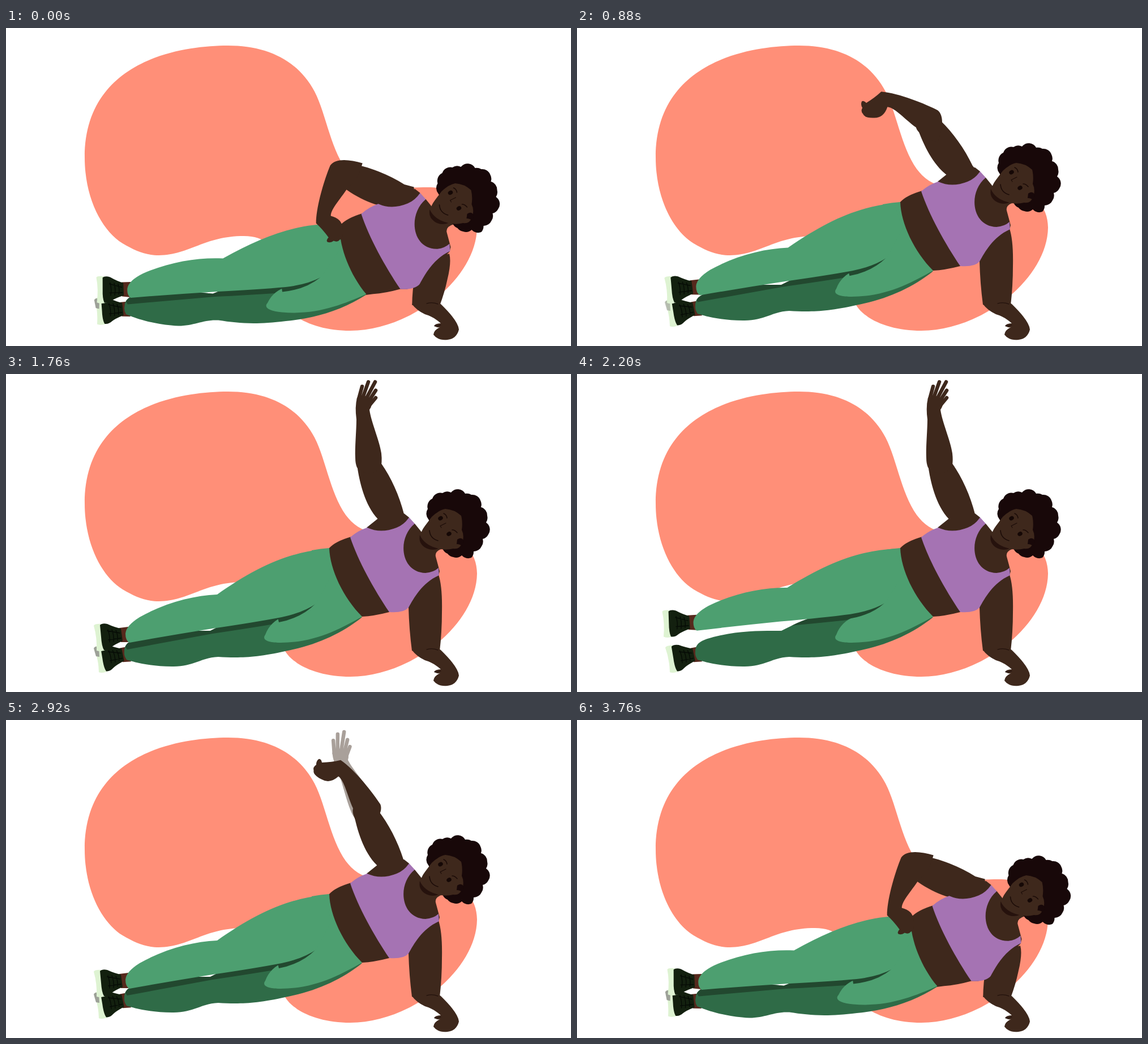
Animation of 998x561 px, one loop 3.8 s. Source, as an HTML page:

```html
<!DOCTYPE html>
<html lang="en">
<head>
<meta charset="utf-8">
<title>Side plank</title>
<style>
  html, body { margin: 0; width: 100%; height: 100%; overflow: hidden; background: #fff; }
  svg { display: block; width: 100vw; height: 100vh; }
  .skin { fill: #3e281c; }
  .light { fill: #4d9f70; }
  .dark { fill: #2f6b47; }
  .shade { fill: #22482f; }
  .line { fill: none; stroke: #1c0c08; stroke-width: 1.6; stroke-linecap: round; stroke-linejoin: round; }
  .thin { stroke-width: 1.1; }
  .lace { stroke: #050a05; stroke-width: 1.3; }
</style>
</head>
<body>
<svg viewBox="0 0 998 561" preserveAspectRatio="none">
  <defs>
    <path id="backLeg" d="M209 490C209 473 222 469 245 463C290 452 330 453 361 453C385 441 410 428 440 424L560 400L629 429C590 460 545 479 493 489C440 501 410 501 375 499C345 500 330 517 293 516C255 516 225 508 213 504Q208 497 209 490Z"/>
    <clipPath id="onBackLeg"><use href="#backLeg"/></clipPath>
    <g id="shoe">
      <path fill="#56291d" d="M200 448L216 446L218 473L203 473Z"/>
      <path fill="#def3d2" d="M155 444Q157 440 169 441L178 486Q168 491 160 488Q161 465 155 444Z"/>
      <path fill="#13200f" d="M166 443Q170 439 179 441Q192 447 203 449L206 471Q192 477 186 482Q180 488 173 487Q169 480 168 464Z"/>
      <path class="line lace" d="M180 451Q184 462 183 473M187 451Q191 461 190 472M194 452Q198 461 197 470M179 453L201 457M181 469L203 466"/>
    </g>
  </defs>

  <path fill="#ff8f78" d="M392 31C301 31 139 61 139 228C139 300 169 357 206 380C228 393 247 401 270 401C325 400 350 367 420 367C500 367 460 445 493 489C510 516 555 534 608 534C715 534 831 442 832 352C832 310 800 281 745 281C700 281 665 288 628 273C577 248 570 160 545 112C515 56 460 31 392 31Z"/>

  <g id="prop" class="skin">
    <path d="M764 354Q771 375 770 420Q770 455 766 489L755 500L717 488Q712 450 711 411L730 365Z"/>
  </g>
  <path class="skin" d="M717 487Q725 498 740 505Q755 509 768 521Q760 521 756 525Q760 529 767 528Q756 532 755 541Q763 552 780 550Q796 548 800 532Q799 517 768 487Q745 470 717 487Z"/>
  <path class="line thin" d="M743 486Q753 483 763 487M757 526L768 524"/>

  <g id="torso">
    <path class="skin" d="M550 325L571 307Q582 295 610 287L690 420L677 420Q650 427 629 428L612 430L570 390Z"/>
    <path class="skin" d="M705 262L722 264L735 280L772 308Q757 312 759 322L766 348L764 356L711 410L680 400Z"/>
    <path class="skin" d="M637 271L657 255L703 246L712 253L712 275L650 285Z"/>
    <path id="upper" class="skin" d="M620 160C624 190 634 232 657 256L655 275Q690 290 712 262L703 247C695 215 680 182 663 158Z"/>
    <path fill="#a573b3" d="M608 288Q622 276 638 271Q662 282 690 271Q703 266 712 253L722 264C690 290 697 350 741 351Q755 350 764 342L765 355C735 368 720 396 711 412Q702 422 677 420C650 380 622 330 608 288Z"/>
  </g>

  <g id="pants">
    <use href="#shoe" transform="translate(1 38) rotate(-4 165 445)"/>
    <path id="soleShade" fill="#9da198" d="M155 484Q157 479 164 482L165 499L159 498Z"/>
    <use href="#backLeg" class="dark"/>
    <g clip-path="url(#onBackLeg)">
      <path class="shade lift" d="M205 474L290 460L365 448L440 436L520 412L546 406Q520 430 480 440Q420 450 365 458L214 486Z"/>
    </g>
    <path class="light" d="M540 311Q556 308 571 307C572 345 596 395 629 428C590 450 545 474 485 474C460 474 452 468 458 460C464 444 475 434 490 428Q512 418 520 400Z"/>
    <path class="shade lift" d="M480 430Q525 419 546 406Q522 430 482 438Z"/>
    <g class="lift">
      <use href="#shoe"/>
      <path class="light" d="M211 458Q212 444 236 429C280 404 330 391 373 389C440 342 495 316 560 309L575 355L548 405Q525 421 487 429Q440 438 365 449Q290 461 218 474Q211 470 211 458Z"/>
    </g>
  </g>

  <g id="arm" class="skin">
    <g id="open">
      <path d="M620 165Q617 158 617 148C616 130 619 100 619 80Q616 58 620 42Q630 34 646 44Q648 55 642 63C645 85 660 118 663 140Q665 158 661 166Q641 185 620 165Z"/>
      <path fill="none" stroke="#3e281c" stroke-width="6.5" stroke-linecap="round" d="M623 44L629 22M630 42L640 14M637 42L652 14M642 46L653 29M643 54L653 42"/>
    </g>
    <path id="fist" d="M606 210C582 203 558 201 549 214C540 235 524 285 524 316Q536 327 546 341Q541 346 544 349Q550 351 555 347Q562 350 566 345Q573 342 571 325Q570 308 550 303C550 290 570 270 582 250Q596 245 606 210Z"/>
  </g>

  <g id="head">
    <path id="hair" fill="#180809"/>
    <path class="skin" d="M752 252Q765 240 776 238Q792 239 804 250Q807 262 805 275Q810 285 806 298Q801 310 790 308Q775 312 760 307Q740 303 733 288Q731 280 740 268Z"/>
    <path fill="#180809" d="M797 292Q806 286 809 296L806 304Q802 300 796 300Z"/>
    <path fill="#26120d" d="M731 284Q728 298 740 306Q752 313 764 308Q742 303 733 288Z"/>
    <g fill="#150806">
      <ellipse cx="767.5" cy="254.5" rx="3.6" ry="4.4" transform="rotate(60 767.5 254.5)"/>
      <ellipse cx="782.5" cy="282" rx="3.6" ry="4.4" transform="rotate(60 782.5 282)"/>
    </g>
    <path class="line" d="M773 246Q778 248 779 254M788 275Q793 275 797 280M748 276Q749 290 763 294"/>
    <path class="line thin" d="M777 263L767 268L769 271"/>
  </g>
</svg>
<script>
const LOOP = 3800;
const SHOULDER = [682, 266];
const RAISED_ELBOW = [641, 160], HIP_ELBOW = [575, 228];
const UPPER_TURN = -49, OPEN_TURN = -135, FIST_TURN = 145;

const $ = id => document.getElementById(id);
const lifted = document.querySelectorAll('.lift');
const clamp = v => Math.min(1, Math.max(0, v));
const ease = (t, from, to) => (1 - Math.cos(Math.PI * clamp((t - from) / (to - from)))) / 2;
const pulse = (t, from, half) => ease(t, from, from + half) - ease(t, from + half, from + 2 * half);
const set = (el, value) => el.setAttribute('transform', value);

// Curls: round bumps between neighbouring valleys of the outline
const curls = ['745 238', '753 220', '771 210', '786 209', '811 211', '822 213', '838 223', '839 235',
  '850 250', '848 262', '852 283', '842 291', '840 304', '826 313', '822 324', '805 320', '790 323',
  '780 317', '772 310'];
$('hair').setAttribute('d', 'M746 256' + curls.map(p => 'A15 15 0 0 1 ' + p).join('') + 'L760 280Z');

function turn([x, y], [cx, cy], deg) {
  const a = deg * Math.PI / 180, c = Math.cos(a), s = Math.sin(a);
  return [cx + (x - cx) * c - (y - cy) * s, cy + (x - cx) * s + (y - cy) * c];
}

function placeFore(el, joint, elbow, deg, opacity) {
  set(el, `translate(${elbow[0]} ${elbow[1]}) rotate(${deg}) translate(${-joint[0]} ${-joint[1]})`);
  el.setAttribute('opacity', opacity);
}

function draw(t) {
  const low = 1 - ease(t, 0, 550) + ease(t, 3320, 3760);
  const bend = 1 - ease(t, 570, 1090) + ease(t, 2800, 3290);
  const lift = pulse(t, 800, 480) + pulse(t, 1940, 480);

  set($('torso'), `matrix(1 ${-.014 * low} 0 ${1 + .012 * low} ${19.5 * low} ${45 * low})`);
  set($('arm'), `translate(${19.5 * low} ${39 * low})`);
  set($('head'), `translate(${17.5 * low} ${36 * low})`);
  set($('prop'), `matrix(1 0 ${-.14 * low} ${1 - .325 * low} ${68.6 * low} ${159.3 * low})`);
  set($('pants'), `matrix(${1 + .003 * low} ${.0955 * low} ${-.092 * low} ${1 - .01 * low} ${44.9 * low} ${-14.2 * low})`);

  lifted.forEach(el => set(el, `rotate(${5.9 * lift} 576 355)`));
  $('soleShade').setAttribute('opacity', clamp(1 - 5 * lift));

  const upper = UPPER_TURN * bend ** 1.4 + 5.4 * low;
  const elbow = turn(RAISED_ELBOW, SHOULDER, upper);
  set($('upper'), `rotate(${upper} ${SHOULDER})`);
  placeFore($('open'), RAISED_ELBOW, elbow, OPEN_TURN * bend, clamp((.24 - bend) / .22));
  placeFore($('fist'), HIP_ELBOW, elbow, FIST_TURN * (1 - bend), clamp(bend / .1));
}

const start = performance.now();
function tick(now) {
  draw(Math.max(0, now - start) % LOOP);
  requestAnimationFrame(tick);
}
draw(0);
requestAnimationFrame(tick);
</script>
</body>
</html>
```
